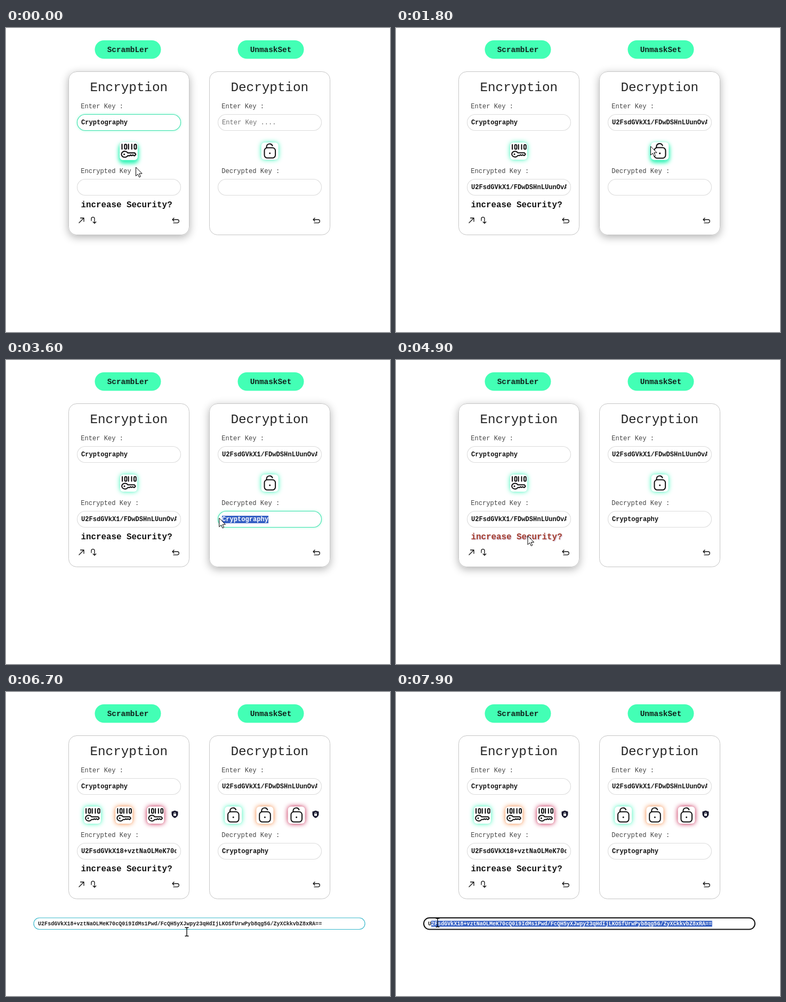
An HTML page with a canvas for the animation above (8000 ms loop, 720x568 px).

```html
<!DOCTYPE html>
<html lang="en">
<head>
<meta charset="utf-8">
<title>Key cards</title>
<style>
  html, body { margin: 0; width: 100%; height: 100%; overflow: hidden; background: #fff; }
  canvas { display: block; }
</style>
</head>
<body>
<canvas id="stage" width="720" height="568"></canvas>
<script>
const ctx = document.getElementById('stage').getContext('2d');
const LOOP = 8000, STEP = 100;
const GREEN = '#43ffb5', MINT = '#35f5b8', ORANGE = '#f28038', RED = '#c01040';
const LINE = '#dcdcdc', INK = '#111111', BLUE = '#3560c4';
const PLAIN = 'Cryptography';
const FIRST_CODE = 'U2FsdGVkX1/FDwDSHnLUunOvA';
const LONG_CODE = 'U2FsdGVkX18+vztNaOLMeK70cQ0i9IdMs1Pwd/FcQH5yXJwpy23qHdIjLKOSfUrwPyb8qg5G/ZyXCkkvbZ8xRA==';
const LONG_SIZE = 10.09;

// Pointer stops: time, x, y
const STOPS = [
  [0, 243, 260], [200, 239, 237], [500, 239, 237], [800, 305, 298], [1100, 140, 298],
  [1250, 160, 290], [1450, 440, 178], [1600, 440, 178], [1800, 477, 221], [2000, 486, 231],
  [2700, 487, 233], [3100, 498, 296], [3200, 498, 296], [3500, 399, 295], [3800, 400, 296],
  [4400, 285, 318], [4800, 246.5, 328.5], [5200, 246.5, 328.5], [5700, 160, 226],
  [6000, 160, 226], [6300, 141, 358], [6400, 141, 358], [6700, 339, 448],
  [7200, 602, 436], [7300, 602, 434], [7900, 78, 431]
];

const clamp = v => Math.max(0, Math.min(1, v));
const ramp = (t, start, length = 300) => clamp((t - start) / length);
const pulse = (t, start, end, length = 200) => ramp(t, start, length) - ramp(t, end, length);
const within = (t, start, end) => t >= start && t < end;

function pointerAt(t) {
  const next = STOPS.findIndex(stop => stop[0] > t);
  if (next < 0) return STOPS.at(-1).slice(1);
  const [t0, x0, y0] = STOPS[next - 1], [t1, x1, y1] = STOPS[next];
  const u = (t - t0) / (t1 - t0), eased = u * u * (3 - 2 * u);
  return [x0 + (x1 - x0) * eased, y0 + (y1 - y0) * eased];
}

function mix(a, b, u) {
  const part = (hex, i) => parseInt(hex.slice(i, i + 2), 16);
  return `rgb(${[1, 3, 5].map(i => Math.round(part(a, i) + (part(b, i) - part(a, i)) * u))})`;
}

function text(str, x, y, size, color = INK, weight = 'bold', align = 'left') {
  ctx.font = `${weight} ${size}px "Courier New", "Liberation Mono", monospace`;
  ctx.textAlign = align;
  ctx.fillStyle = color;
  ctx.fillText(str, x, y);
}

function box(x, y, w, h, r, fill, stroke, width = 1) {
  ctx.beginPath();
  ctx.roundRect(x, y, w, h, r);
  if (fill) { ctx.fillStyle = fill; ctx.fill(); }
  if (stroke) { ctx.strokeStyle = stroke; ctx.lineWidth = width; ctx.stroke(); }
}

// White rounded plate that casts a coloured shadow
function plate(x, y, w, h, r, color, blur, dy = 0) {
  ctx.save();
  ctx.shadowColor = color;
  ctx.shadowBlur = blur;
  ctx.shadowOffsetY = dy;
  box(x, y, w, h, r, '#fff');
  ctx.restore();
}

function strokePath(d, width, color = INK) {
  ctx.strokeStyle = color;
  ctx.lineWidth = width;
  ctx.lineCap = ctx.lineJoin = 'round';
  ctx.stroke(new Path2D(d));
}

function outlined(d, width) {
  ctx.fillStyle = '#fff';
  ctx.fill(new Path2D(d));
  strokePath(d, width, '#000');
}

function at(x, y, paint, scale = 1) {
  ctx.save();
  ctx.translate(x, y);
  ctx.scale(scale, scale);
  paint();
  ctx.restore();
}

function dot(x, y, r) {
  ctx.fillStyle = INK;
  ctx.beginPath();
  ctx.arc(x, y, r, 0, 7);
  ctx.fill();
}

function keyIcon() {
  [...'10110'].forEach((digit, i) => {
    const x = -11.4 + i * 5.8;
    if (digit === '1') strokePath(`M${x - .5} -12 v8.4`, 2.1);
    else box(x - 1.8, -12, 3.8, 8.4, 1.9, null, INK, 2);
  });
  strokePath('M-1.6 3.2 A6 5.3 0 1 0 -1.6 8.2 H2 l1.5-1.4 2 1.4 2-1.4 2 1.4 h1.4 l1.8-2.4 -1.8-2.6 Z', 2);
  dot(-8, 5.7, 1.5);
}

function lockIcon() {
  box(-10.2, -6.2, 20.6, 19, 5.5, null, INK, 2);
  strokePath('M-6.2 -6.2 V-8 A5.8 5.8 0 0 1 4.9 -10', 2);
  dot(0, 4, 1.5);
}

function tile(icon, x, color, hover = 0) {
  at(x, 230, () => {
    plate(-16, -16, 32, 32, 6, color, 10, 5 * hover);
    if (hover) plate(-16, -16, 32, 32, 6, color, 8, 4 * hover);
    icon();
  }, 1 + 0.05 * hover);
}

function shield(x) {
  at(x, 228.5, () => {
    ctx.fillStyle = '#17172e';
    ctx.fill(new Path2D('M0 -7 L6 -5 V0 Q5.5 4.5 0 7 Q-5.5 4.5 -6 0 V-5 Z'));
    box(-2.5, -1, 5, 4, .5, '#fff');
    strokePath('M-1.5 -1 V-2 A1.5 1.5 0 0 1 1.5 -2 V-1', 1, '#fff');
  });
}

function field(x, y, value, focus = 0, selectFrom = null) {
  if (focus) plate(x, y, 195, 31, 15.5, `rgba(67,255,181,${focus * .5})`, 4);
  box(x + .5, y + .5, 194, 30, 15, '#fff', mix(LINE, '#3fe0ae', focus), 1.1);
  ctx.save();
  ctx.beginPath();
  ctx.rect(x + 8, y, 178.5, 31);
  ctx.clip();
  const left = x + 8, base = y + 19;
  text(value, left, base, 12.1);
  if (selectFrom !== null) {
    const start = Math.max(left, selectFrom);
    const width = left + value.length * 7.26 - start;
    if (width > 0) {
      ctx.beginPath();
      ctx.rect(start, y + 9, width, 14);
      ctx.clip();
      ctx.fillStyle = BLUE;
      ctx.fillRect(start, y + 9, width, 14);
      text(value, left, base, 12.1, '#fff');
    }
  }
  ctx.restore();
}

function card(x, buttonX, name, title, label, lift) {
  box(buttonX, 23, 124, 34.5, 17.2, GREEN);
  text(name, buttonX + 62, 45, 14.4, '#10221b', 'bold', 'center');
  plate(x, 81, 227, 306, 15.5, `rgba(0,0,0,${.3 * lift})`, 16, 4);
  box(x + .5, 81.5, 226, 305, 15, '#fff', '#c6c6c6');
  text(title, x + 113.3, 117.5, 24.3, '#242424', 'normal', 'center');
  text('Enter Key :', x + 23.3, 149.5, 12.1, '#444', 'normal');
  text(label + ' Key :', x + 23.3, 271, 12.1, '#444', 'normal');
  at(x + 201, 360, () => strokePath('M-3 -5 L-6 -2 L-3 1 M-6 -2 H3.2 A3.1 3.1 0 0 1 3.2 4.2 H-4', 1.3));
}

function longField(t, pointerX) {
  const focused = t >= 7300;
  box(52, 422, 621, 21.5, 10.7, '#fff', focused ? INK : '#39b8cc', focused ? 2 : 1.2);
  text(LONG_CODE, 60, 436.3, LONG_SIZE, '#222');
  if (!focused) return;
  const charWidth = LONG_SIZE * .6;
  const first = Math.max(0, Math.round((pointerX - 72) / charWidth));
  const start = 60 + first * charWidth, part = LONG_CODE.slice(first);
  if (!part) return;
  ctx.fillStyle = BLUE;
  ctx.fillRect(start, 427.5, part.length * charWidth, 11);
  text(part, start, 436.3, LONG_SIZE, '#fff');
}

const POINTERS = {
  arrow() {
    outlined('M.5 .5 V16.5 L4.2 13 L6.8 18.8 L9.3 17.6 L6.8 12 H11.8 Z', 1);
  },
  hand() {
    outlined('M-2 2 Q-2 0 0 0 Q2 0 2 2 V9 Q4 7 5.2 9.2 Q7.4 8 8 10.2 Q11 9.5 11 12 V17 Q10.5 20 8 24 H-1 Q-2 20 -6 14.5 Q-6 11.5 -2 14 Z', 1.2);
    strokePath('M2 9 V13 M5.2 9.5 V13 M8 10.5 V13', 1, '#000');
  },
  beam() {
    strokePath('M-3 -8 H-1 L0 -7 L1 -8 H3 M0 -7 V7 M-3 8 H-1 L0 7 L1 8 H3', 1.3, '#000');
  }
};

function pointerKind(t) {
  if (within(t, 5700, 6100) || within(t, 6300, 6500)) return 'hand';
  if (within(t, 700, 1100) || within(t, 1400, 1700) || within(t, 3000, 3400) || t >= 6700) return 'beam';
  return 'arrow';
}

function draw(t) {
  const [px, py] = pointerAt(t);
  ctx.fillStyle = '#fff';
  ctx.fillRect(0, 0, 720, 568);

  const leftLift = 1 - ramp(t, 1300) + ramp(t, 4100) - ramp(t, 6450, 150);
  const rightLift = pulse(t, 1300, 4100, 300);
  card(117, 166.5, 'ScrambLer', 'Encryption', 'Encrypted', leftLift);
  card(381, 434.5, 'UnmaskSet', 'Decryption', 'Decrypted', rightLift);

  field(133, 161, PLAIN, 1 - ramp(t, 400, 200));
  const code = t < 500 ? '' : t < 6100 ? FIRST_CODE : LONG_CODE;
  field(133, 282, code, pulse(t, 800, 1400), within(t, 800, 1500) ? (t < 1100 ? px : 141) : null);
  const pasted = t >= 1600;
  field(397, 161, pasted ? FIRST_CODE : '', pulse(t, 1450, 1600, 150));
  if (!pasted) text('Enter Key ....', 405, 180, 12.1, '#707070', 'normal');
  field(397, 282, t < 2200 ? '' : PLAIN, pulse(t, 3200, 4100), within(t, 3200, 4100) ? px : null);

  if (t < 5300) {
    tile(keyIcon, 230, MINT, 1 - ramp(t, 550, 200));
    tile(lockIcon, 494.7, MINT, pulse(t, 1650, 2800));
  } else {
    [MINT, ORANGE, RED].forEach((color, i) => {
      tile(keyIcon, 162 + i * 59.2, color, i ? 0 : pulse(t, 5600, 6100));
      tile(lockIcon, 426.2 + i * 59.2, color);
    });
    shield(316.5);
    shield(580.5);
  }

  const warn = pulse(t, 4650, 5300);
  ctx.save();
  ctx.shadowColor = `rgba(120,60,140,${warn * .4})`;
  ctx.shadowBlur = 2;
  ctx.shadowOffsetX = ctx.shadowOffsetY = 1;
  text('increase Security?', 140.5, 335, 15.85, mix(INK, '#a5402f', warn));
  ctx.restore();
  strokePath('M137 364 L146 355 M139.5 355 H146 V361.5', 1.3);
  strokePath('M160 360 V356.3 A3 3 0 0 1 166 356.3 V365 M163.2 362.3 L166 365 L168.8 362.3', 1.3);

  if (t >= 6400) longField(t, px);
  at(px, py, POINTERS[pointerKind(t)]);
}

function frame() {
  draw(Math.floor(performance.now() % LOOP / STEP) * STEP);
  requestAnimationFrame(frame);
}
frame();
</script>
</body>
</html>
```
